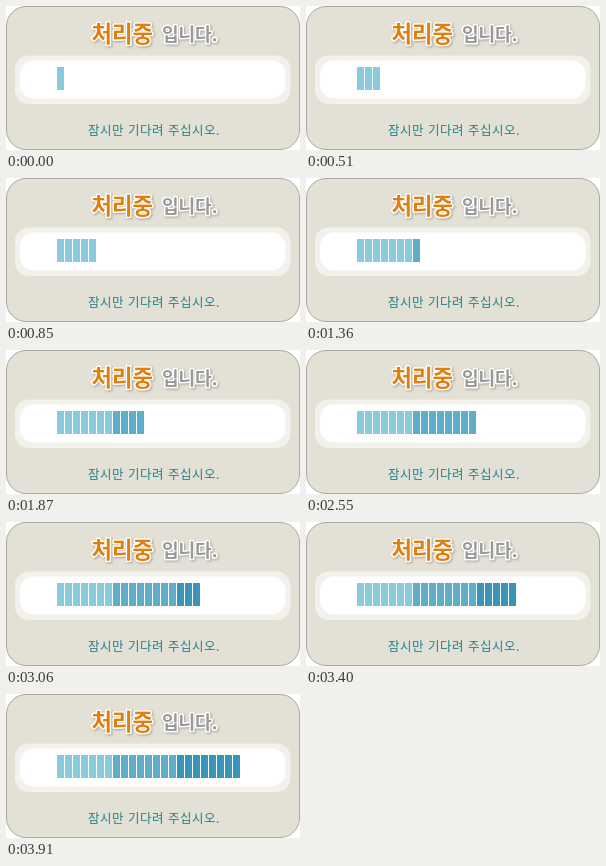
An HTML page that plays this animation: 294x144 px, repeating every 4.08 s.

```html
<!DOCTYPE html>
<html lang="ko">
<head>
<meta charset="utf-8">
<style>
  html, body { margin: 0; width: 100%; height: 100%; overflow: hidden; background: #fff; }
  svg { display: block; width: 294px; height: 144px; }
  text { font-family: "Noto Sans CJK KR", "Noto Sans CJK", sans-serif; }
  .title { font-weight: 700; stroke: #fff; stroke-width: 3; stroke-linejoin: round; paint-order: stroke;
           filter: drop-shadow(1.5px 1.5px 1px #8c887cb0); }
</style>
</head>
<body>
<svg viewBox="0 0 294 144">
  <rect x=".5" y=".5" width="293" height="143" rx="19.5" fill="#e3e0d6" stroke="#aaa8a2"/>
  <rect x="9" y="49.5" width="275.5" height="48.5" rx="14" fill="#f3f1ec"/>
  <rect x="14" y="54.5" width="265.5" height="38" rx="14" fill="#fff"/>
  <text class="title" x="85.5" y="35.5" font-size="22.3" fill="#e17f0c">처리중</text>
  <text class="title" x="156" y="35" font-size="18" fill="#989898">입니다.</text>
  <text x="82" y="129" font-size="12.5" letter-spacing=".5" fill="#1f808b">잠시만 기다려 주십시오.</text>
  <g id="bars"></g>
</svg>
<script>
  const STEP = 170, STEPS = 24, BARS = 23;
  const group = document.getElementById("bars");
  const colorOf = i => i < 7 ? "#8acadd" : i < 15 ? "#5eaeca" : "#3a94b7";

  const bars = Array.from({ length: BARS }, (_, i) => {
    const bar = document.createElementNS(group.namespaceURI, "rect");
    const attributes = { x: 51 + 8 * i, y: 61, width: 7, height: 23, fill: colorOf(i) };
    for (const name in attributes) bar.setAttribute(name, attributes[name]);
    return group.appendChild(bar);
  });

  const start = performance.now();
  function draw(now) {
    const step = Math.floor(Math.max(0, now - start) / STEP) % STEPS;
    // The second bar holds for two steps.
    const count = step < 2 ? step + 1 : step;
    bars.forEach((bar, i) => bar.setAttribute("visibility", i < count ? "visible" : "hidden"));
    requestAnimationFrame(draw);
  }
  draw(start);
</script>
</body>
</html>
```
